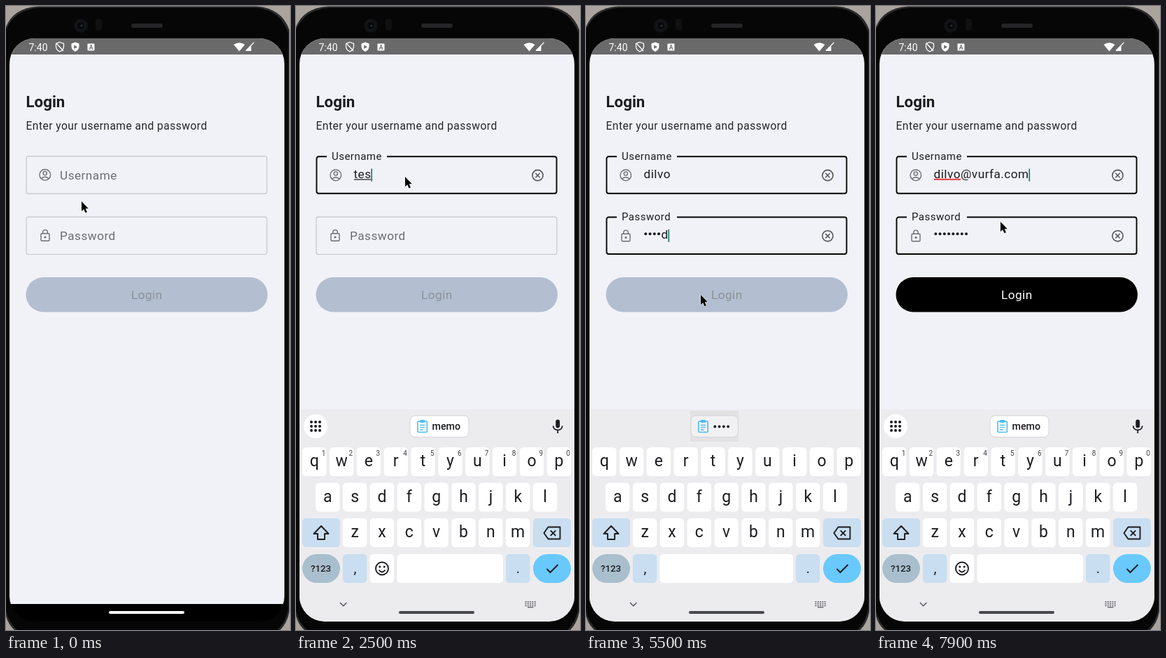
Recreate the animation shown at these times as an HTML page. Size 406 by 888 pixels, loop 8000 ms.

```html
<!DOCTYPE html>
<html lang="en">
<head>
<meta charset="utf-8">
<title>Login form</title>
<style>
html, body { margin: 0; width: 100%; height: 100%; overflow: hidden; background: #000; }
svg { display: block; width: 406px; height: 888px; font-family: Roboto, sans-serif; }
.body { letter-spacing: .48px; font-size: 17.2px; }
</style>
</head>
<body>
<svg id="stage" viewBox="0 0 406 888"></svg>
<script>
const NS = 'http://www.w3.org/2000/svg';
const LOOP = 8000;
const INK = '#1b1c1f', PAGE = '#f1f2f8', GREY = '#6c6d72', BLUE = '#c9def0';
const stage = document.getElementById('stage');

function el(parent, tag, attrs = {}, text) {
  const node = document.createElementNS(NS, tag);
  set(node, attrs);
  if (text !== undefined) node.textContent = text;
  parent.appendChild(node);
  return node;
}
function set(node, attrs) {
  for (const k in attrs) node.setAttribute(k, attrs[k]);
}
const group = (p, a) => el(p, 'g', a);
const box = (p, x, y, width, height, rx, fill, more) => el(p, 'rect', { x, y, width, height, rx, fill, ...more });
const dot = (p, cx, cy, r, fill, more) => el(p, 'circle', { cx, cy, r, fill, ...more });
const line = (p, d, stroke, width = 1.5, more) =>
  el(p, 'path', { d, fill: 'none', stroke, 'stroke-width': width, ...more });
const shape = (p, d, fill) => el(p, 'path', { d, fill });
const label = (p, x, y, text, size, fill, more) => el(p, 'text', { x, y, 'font-size': size, fill, ...more }, text);
const show = (node, on) => node.setAttribute('visibility', on ? 'inherit' : 'hidden');
const clamp = v => Math.max(0, Math.min(1, v));
const easeOut = p => 1 - (1 - p) ** 2;
const mid = { 'text-anchor': 'middle' };

// Phone body
box(stage, 0, 0, 406, 888, 0, '#aaa39e');
shape(stage, 'M0 868V30Q10 3 46 .5H358Q394 3 405 34V862Q402 878 392 888H12Q3 880 0 868Z', '#2a2a2b');
shape(stage, 'M0 860V34Q12 5 48 2.500H356Q392 5 403.500 38V858Q400 877 388 888H16Q4 878 0 860Z', '#060607');
dot(stage, 107, 28, 10, '#111214');
dot(stage, 107, 28, 6, '#08090b', { stroke: '#1c1e22' });
dot(stage, 108, 28, 1.6, '#2c3036');
box(stage, 128, 18, 9, 17, 4, '#101113');
box(stage, 179, 25, 45, 6, 3, '#252527');

// Screen
const clip = el(el(stage, 'defs'), 'clipPath', { id: 'screen' });
box(clip, 5, 46, 393, 830, 36);
const screen = group(stage, { 'clip-path': 'url(#screen)' });
box(screen, 5, 46, 393, 830, 0, '#000');
box(screen, 5, 46, 393, 805, 0, PAGE);
box(screen, 5, 46, 393, 23, 0, '#6a6a6b');
box(screen, 147, 861, 108, 4, 2, '#fff');

// Status bar
label(screen, 32.5, 63.5, '7:40', 14, '#fff');
const shield = x => `M${x} 51.5L${x + 5.5} 53.5V57.5Q${x + 5.5} 62.5 ${x} 65Q${x - 5.5} 62.5 ${x - 5.5} 57.5V53.5Z`;
line(screen, shield(77), '#fff', 1.3);
line(screen, 'M72 53L82 64', '#fff', 1.3);
shape(screen, shield(99), '#fff');
shape(screen, 'M97.2 55.5L102 58.3L97.2 61Z', '#6a6a6b');
box(screen, 116.5, 53.5, 10, 10, 1, '#fff');
label(screen, 121.5, 61.8, 'A', 8.5, '#6a6a6b', { ...mid, 'font-weight': 700 });
shape(screen, 'M325.5 55Q333.500 49.500 341.500 55L333.500 64.500Z', '#fff');
shape(screen, 'M350.500 56V64H342.500Z', '#fff');
line(screen, 'M343 63.500L354.500 52', '#fff', 1.2);

// Form
label(screen, 28.5, 144, 'Login', 22.3, INK, { 'font-weight': 700 });
label(screen, 28.5, 176, 'Enter your username and password', 15.65, '#25262a', { 'letter-spacing': .43 });

function makeField(y, name, drawIcon) {
  const g = group(screen, { transform: `translate(0 ${y})` });
  const frame = box(g, 29, 0, 344, 53.3, 3, 'none');
  const notch = box(g, 44, -4, 86, 8, 0, PAGE);
  const icon = group(g, { fill: 'none', stroke: GREY, 'stroke-width': 1.4 });
  drawIcon(icon);
  const title = label(g, 77, 32.5, name, 17.2, GREY, { 'letter-spacing': .48 });
  const underline = line(g, '', INK, 1.3);
  const dots = Array.from({ length: 8 }, (_, i) => dot(g, 85.3 + i * 6.25, 23.9, 2, INK));
  const text = label(g, 82.5, 30.5, '', 17.2, INK, { class: 'body' });
  const caret = box(g, 0, 17.5, 1.8, 18, 0, '#1f8078');
  const clear = group(g, { fill: 'none', stroke: '#55565a', 'stroke-width': 1.6 });
  dot(clear, 345.5, 27, 7.6, 'none');
  line(clear, 'M342.300 23.800L348.700 30.200M348.700 23.800L342.300 30.200', '#55565a');
  return { frame, notch, icon, title, underline, dots, text, caret, clear };
}

function drawField(f, s) {
  const on = s.float > 0, p = easeOut(s.float);
  // The border grows inwards from fixed bounds.
  const w = on ? 1.9 : 1.1;
  set(f.frame, {
    x: 28.5 + w / 2, y: -.7 + w / 2, width: 345 - w, height: 54.4 - w,
    stroke: on ? '#050506' : '#c3c4c9', 'stroke-width': w
  });
  show(f.notch, on);
  set(f.icon, { transform: on ? 'translate(1 .5)' : '' });
  set(f.title, { x: 77 - 26 * p, y: 32.5 - 27.7 * p, 'font-size': 17.2 - 2.2 * p, fill: on ? INK : GREY });
  f.dots.forEach((d, i) => show(d, i < s.masked));
  if (f.text.textContent !== s.text) f.text.textContent = s.text;
  const start = 82.5 + s.masked * 6.25;
  set(f.text, { x: start });
  const end = start + (s.text ? f.text.getComputedTextLength() : 0);
  set(f.caret, { x: end - .3 });
  show(f.caret, s.caret);
  show(f.underline, s.line);
  const red = s.line === 'red';
  set(f.underline, {
    d: `M83 32.800H${Math.max(83, red ? 121 : end)}`,
    stroke: red ? '#e5383b' : INK,
    'stroke-width': red ? 2 : 1.3
  });
  show(f.clear, s.clear);
}

const user = makeField(214, 'Username', g => {
  dot(g, 55.8, 26.3, 7.8);
  dot(g, 55.8, 24, 2.6);
  line(g, 'M50.500 31.500Q55.800 27 61 31.500', GREY, 1.4);
});
const pass = makeField(300.3, 'Password', g => {
  box(g, 50, 23.5, 12, 10.5, 1.2, 'none');
  line(g, 'M52.700 23.500V21.500Q52.700 18.300 56 18.300T59.300 21.500V23.500', GREY, 1.4);
  dot(g, 56, 28.7, .9, GREY);
});
const button = box(screen, 28.5, 386, 345.5, 49.5, 24.75);
const buttonText = label(screen, 201.3, 417.3, 'Login', 17.2, '', { class: 'body', ...mid });

// Keyboard
const keyboard = group(screen);
const fringe = box(keyboard, 15, 565, 370, 9, 2, '#f6f7fa');
box(keyboard, 5, 574, 393, 330, 0, '#ececef');
const textOnly = group(keyboard), passOnly = group(keyboard);

function key(p, x, y, width, fill = '#fff', rx = 5.5) {
  box(p, x, y, width, 41, rx, fill);
}
function letters(row, x0, y) {
  [...row].forEach((ch, i) => {
    const x = x0 + i * 38.85;
    key(keyboard, x, y, 34.4);
    label(keyboard, x + 17.2, y + 27, ch, 23, '#1c1d20', mid);
  });
}
letters('qwertyuiop', 9, 628);
letters('asdfghjkl', 28.1, 678.5);
letters('zxcvbnm', 66.9, 729);
const hints = group(keyboard);
[...'1234567890'].forEach((n, i) => label(hints, 39.5 + i * 38.85, 640, n, 10, '#3c3d40', mid));

key(keyboard, 9, 729, 54, BLUE);
line(keyboard, 'M36 740L46.500 751H41V759H31V751H25.500Z', INK, 1.9, { 'stroke-linejoin': 'round' });
key(keyboard, 339, 729, 54, BLUE);
line(keyboard, 'M360.500 741.500H377.500V758.500H360.500L354.500 750Z', INK, 1.9, { 'stroke-linejoin': 'round' });
line(keyboard, 'M363.800 746.300L371.300 753.800M371.300 746.300L363.800 753.800', INK, 1.9);
key(keyboard, 9, 780, 54, '#a9bfcd', 20.5);
label(keyboard, 35.5, 805, '?123', 13.3, INK, { ...mid, 'font-weight': 500 });
key(keyboard, 66.9, 780, 34.4, BLUE);
label(keyboard, 84.500, 807, ',', 20, INK, mid);
key(textOnly, 105.7, 780, 34.4);
dot(textOnly, 123, 800.5, 9, 'none', { stroke: INK, 'stroke-width': 1.9 });
dot(textOnly, 119.8, 798, 1.5, INK);
dot(textOnly, 126.2, 798, 1.5, INK);
line(textOnly, 'M118.500 802.500Q123 808.500 127.500 802.500', INK, 1.8);
key(textOnly, 144.500, 780, 151.5);
key(passOnly, 105.5, 780, 190.5);
key(keyboard, 300, 780, 34.4, BLUE);
label(keyboard, 317.5, 807, '.', 20, INK, mid);
key(keyboard, 339, 780, 54, '#69c9fd', 20.5);
line(keyboard, 'M358.500 801L363.500 806L374.500 795', INK, 2);

// Suggestion strip
function clipboard(p, x) {
  const c = '#4dbcec';
  box(p, x - 6.7, 591, 13.4, 15.5, 1.2, 'none', { stroke: c, 'stroke-width': 1.6 });
  box(p, x - 3.5, 589, 7, 4, 1, c);
  line(p, `M${x - 3.5} 596.500H${x + 3.5}M${x - 3.5} 599.700H${x + 3.5}M${x - 3.5} 603H${x + 1}`, c, 1.3);
}
const chip = (p, x, w) => box(p, x, 583, w, 30.5, 7, '#fff', { stroke: '#d3d3d7' });
dot(textOnly, 28, 598, 17, '#fff');
for (let i = 0; i < 9; i++) dot(textOnly, 22 + i % 3 * 6, 592 + Math.floor(i / 3) * 6, 2, INK);
chip(textOnly, 163, 84);
clipboard(textOnly, 180.7);
label(textOnly, 194.5, 602.5, 'memo', 14.3, INK, { 'font-weight': 500 });
box(textOnly, 371.3, 588.5, 5.8, 12, 2.9, INK);
line(textOnly, 'M367.700 597.500Q368 603.300 374.200 603.300T380.700 597.500M374.200 603.300V608', INK, 1.8);
const chipShade = box(passOnly, 149, 576, 69, 44, 0, '#e2e2e5');
const passChip = chip(passOnly, 150, 67.5);
clipboard(passOnly, 167.5);
for (let i = 0; i < 4; i++) dot(passOnly, 184.3 + i * 6.3, 598.5, 1.9, INK);

// Navigation row
line(keyboard, 'M63 849L67.700 853.700L72.400 849', '#55565a', 1.5);
const pill = box(keyboard, 147, 861, 108, 4, 2);
for (let i = 0; i < 15; i++)
  box(keyboard, 327.5 + i % 5 * 3.3, 847 + Math.floor(i / 5) * 2.8, 2, 1.7, 0, '#6a6b6f');
box(keyboard, 331, 855, 8.5, 1.4, 0, '#6a6b6f');

const pointer = el(stage, 'path', {
  d: 'M0 0V14L3.200 11.200L5.500 16.300L7.900 15.200L5.700 10.300H9.800Z',
  fill: '#000', stroke: '#fff', 'stroke-width': 1, 'paint-order': 'stroke'
});

// Timeline
const USER_FOCUS = 1000, PASS_FOCUS = 4070, USER_AGAIN = 6100;
const NAME = 'dilvo', EMAIL = NAME + '@vurfa.com', SECRET = 'asdfdsaf';
const userKeys = [
  [0, ''], [1080, 't'], [1180, 'te'], [1400, 'tes'], [2800, 'te'], [2900, 't'], [3000, ''],
  ...[...NAME].map((_, i) => [3100 + i * 120, NAME.slice(0, i + 1)]),
  ...[...EMAIL.slice(5)].map((_, i) => [6450 + i * 120, EMAIL.slice(0, 6 + i)])
];
const passKeys = [[0, '']].concat(
  [4700, 4900, 5100, 5300, 5460, 5600, 5720, 5840].map((t, i) => [t, SECRET.slice(0, i + 1)]));
const pointerPath = [
  [100, 108, 278], [800, 156, 243], [3700, 156, 243], [4050, 124, 309], [4650, 124, 309],
  [5300, 164, 411], [5850, 164, 411], [6150, 192, 232], [7400, 192, 232], [7800, 178, 307]
];

const latest = (keys, t) => keys.filter(k => k[0] <= t).pop();
const blink = (t, since) => Math.floor((t - since) / 500) % 2 === 0;

function pointerAt(t) {
  const i = pointerPath.findIndex(k => k[0] > t);
  if (i === 0) return pointerPath[0].slice(1);
  if (i < 0) return pointerPath[pointerPath.length - 1].slice(1);
  const a = pointerPath[i - 1], b = pointerPath[i], p = (t - a[0]) / (b[0] - a[0]);
  const q = p * p * (3 - 2 * p);
  return [a[1] + (b[1] - a[1]) * q, a[2] + (b[2] - a[2]) * q];
}

function render(t) {
  const inPass = t >= PASS_FOCUS && t < USER_AGAIN;
  const inUser = t >= USER_FOCUS && !inPass;
  const [userTime, userText] = latest(userKeys, t);
  const [passTime, passText] = latest(passKeys, t);
  const focusTime = t >= USER_AGAIN ? USER_AGAIN : USER_FOCUS;

  drawField(user, {
    float: clamp((t - USER_FOCUS) / 170),
    text: userText, masked: 0,
    caret: inUser && blink(t, Math.max(userTime, focusTime)),
    line: inUser && userText ? (t >= USER_AGAIN ? 'red' : 'black') : '',
    clear: t >= 1400 && userText !== ''
  });

  const reveal = inPass && passText && t - passTime < 1000 ? 1 : 0;
  drawField(pass, {
    float: clamp((t - PASS_FOCUS) / 170),
    text: reveal ? passText.slice(-1) : '',
    masked: passText.length - reveal,
    caret: inPass && blink(t, Math.max(passTime, PASS_FOCUS)),
    line: '',
    clear: t >= 5460
  });

  const ready = userText === EMAIL;
  set(button, { fill: ready ? '#000' : '#b3bfd0' });
  set(buttonText, { fill: ready ? '#fff' : '#8b9097' });

  const rise = clamp((t - USER_FOCUS) / 285);
  show(keyboard, t >= USER_FOCUS);
  set(keyboard, { transform: `translate(0 ${302 * (1 - rise) ** 2.75})` });
  show(fringe, rise < 1);
  set(pill, { fill: rise < 1 ? '#f8f8fa' : '#48494c' });
  show(textOnly, !inPass);
  show(hints, !inPass);
  show(passOnly, inPass);
  show(chipShade, t >= 5460);
  set(passChip, { fill: t >= 5460 ? '#f1f1f3' : '#fff' });

  set(pointer, { transform: `translate(${pointerAt(t)})` });
}

function tick() {
  render(performance.now() % LOOP);
  requestAnimationFrame(tick);
}
tick();
</script>
</body>
</html>
```
